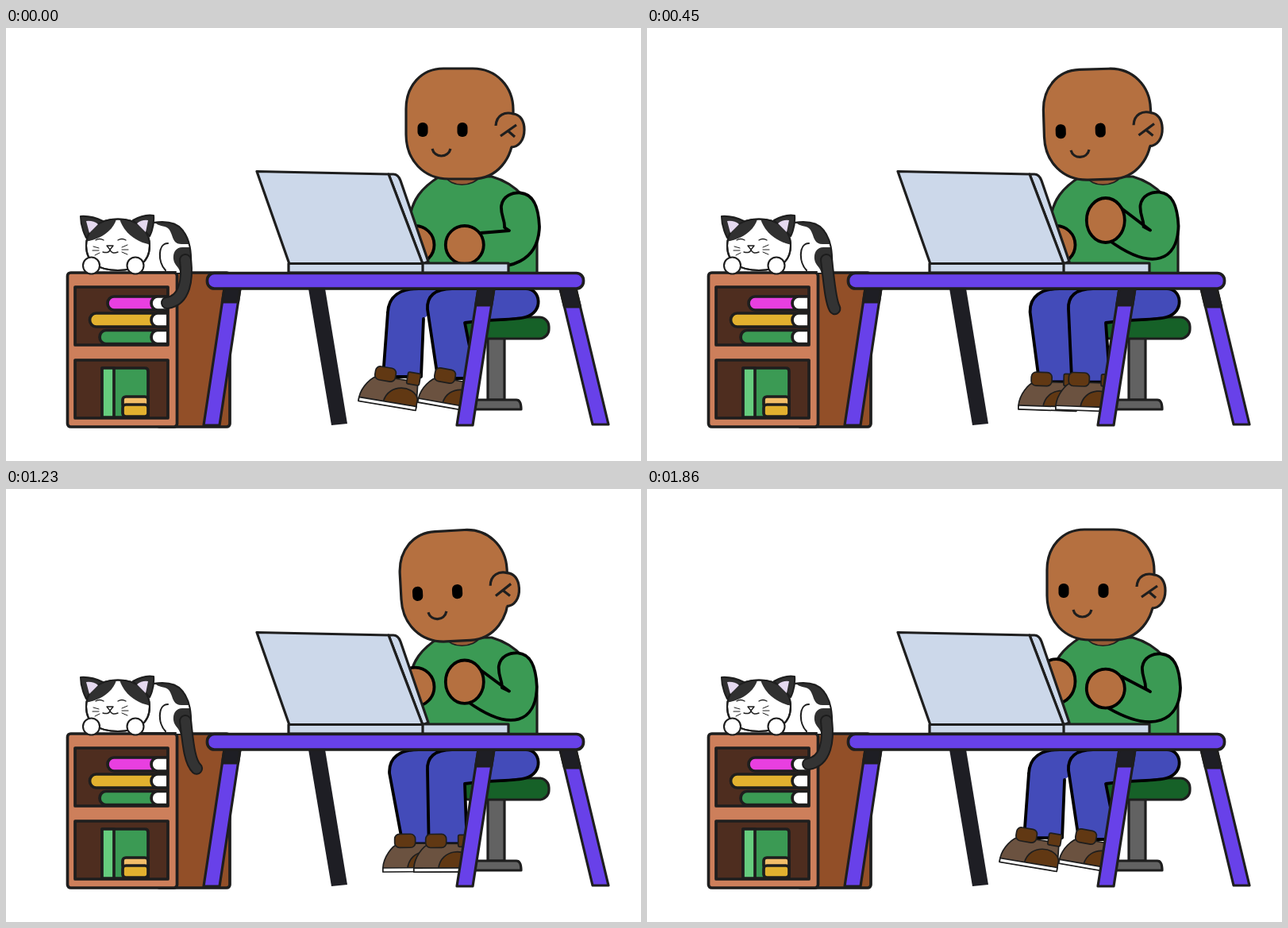
Write an HTML page that moves like this. It is 800x545 px and loops after 1890 ms.

```html
<!DOCTYPE html>
<html lang="en">
<head>
<meta charset="utf-8">
<title>Working at a desk with a cat</title>
<style>
html, body { margin: 0; width: 100%; height: 100%; overflow: hidden; background: #fff; }
svg { display: block; width: 100vw; height: 100vh; }
.ink { stroke: #1e1e1e; stroke-width: 3.2; stroke-linejoin: round; stroke-linecap: round; }
.heavy { stroke-width: 3.7; }
.bold { stroke: #000; stroke-width: 3.8; }
.thin { stroke-width: 1.7; }
.cat { stroke-width: 2.1; }
.line { fill: none; }
.skin { fill: #b57040; }
.shirt { fill: #3b9a54; }
.jeans { fill: #434bb9; }
.purple { fill: #6841e9; }
.metal { fill: #ccd8ea; }
.dark { fill: #1e1e24; }
.fur { fill: #303030; }
.white { fill: #fff; }
.wood { fill: #cd7f5b; }
.hollow { fill: #4e2d1f; }
.gold { fill: #e2b12f; }
.green { fill: #3b9a54; }
</style>
</head>
<body>
<svg viewBox="0 0 800 545" preserveAspectRatio="none">
  <defs>
    <g id="shoe">
      <path class="ink thin" fill="#6b5240" d="M-28 33C-27 20-17 6-8 3H42L45 34V38H-28Z"/>
      <path class="ink thin" fill="#613813" d="M3 34C6 9 39 8 45 24V34Z"/>
      <path class="ink thin white" d="M-28 33.500H45V38.500H-28Z"/>
      <rect class="ink thin" fill="#613813" x="-13" y="-9" width="26" height="17" rx="6"/>
      <rect class="ink thin" fill="#613813" x="28" y="-8" width="16" height="15" rx="2"/>
    </g>
    <clipPath id="headClip"><path id="catHead" d="M141 240.500C165 240.500 181 254 181 274C181 296 164 305 141 305C118 305 101 296 101 274C101 254 117 240.500 141 240.500Z"/></clipPath>
    <clipPath id="bodyClip"><path id="catBody" d="M165 250C185 242 212 241 222 254C232 266 234 282 233 308H165Z"/></clipPath>
  </defs>

  <!-- stool -->
  <g class="ink">
    <rect x="607" y="388" width="21" height="80" fill="#626262"/>
    <path d="M590 468H643Q649 468 649 480H590Z" fill="#626262"/>
    <rect x="572" y="364" width="112" height="27" rx="12" fill="#166128"/>
  </g>
  <path class="dark" d="M381 328H402L430 498 410 500Z"/>

  <!-- legs -->
  <path id="farLeg" class="ink bold jeans"/>
  <use id="farShoe" href="#shoe"/>
  <path id="nearLeg" class="ink bold jeans"/>
  <use id="nearShoe" href="#shoe"/>

  <!-- upper body -->
  <path class="ink shirt" d="M508 310V245C510 216 525 200 546 187H612C640 195 668 218 669 260V310Z"/>
  <path class="ink thin" fill="#965a35" d="M553 186C560 201 588 201 598 186Z"/>
  <ellipse id="farHand" class="ink skin bold" rx="24"/>
  <path id="arm" class="ink bold shirt"/>
  <ellipse id="nearHand" class="ink skin bold" rx="24"/>
  <g id="head" class="ink">
    <path class="skin" d="M551 51H588C618 51 639 74 639 103V132C639 165 618 190 588 190H558C526 190 504 166 504 134V102C504 73 523 51 551 51Z"/>
    <path class="skin" d="M617 123C618 109 629 105 639 108C648 109 653 117 653 128C653 141 646 150 636 150" stroke-linecap="butt"/>
    <path class="line" d="M623 136L643 122M633 130L641 137" stroke-linecap="butt"/>
    <path class="line" d="M537 152C540 164 557 164 560 152" stroke-linecap="butt"/>
    <rect x="518.500" y="119" width="13" height="18" rx="6" fill="#000" stroke="none"/>
    <rect x="568.500" y="119" width="13" height="18" rx="6" fill="#000" stroke="none"/>
  </g>

  <!-- laptop -->
  <g class="ink metal">
    <path d="M482 184H488Q494 184 497 192L532 294 525 297Z"/>
    <path d="M316 180.500L482 184 525 297H357Z"/>
    <path d="M356 296.500H525V308H356ZM525 296H633V308H525Z"/>
  </g>

  <!-- cabinet -->
  <g class="ink heavy">
    <rect x="190" y="308" width="92" height="194" rx="4" fill="#924f28"/>
    <rect class="wood" x="77.500" y="308" width="138" height="194" rx="4"/>
    <path class="hollow" d="M87 326H204V399H87ZM87 418H204V491H87Z"/>
    <g id="books"></g>
    <path class="green" d="M121 428H175Q179 428 179 432V490H121Z"/>
    <path fill="#66cd7e" d="M121 428H136V490H121Z"/>
    <rect fill="#f2bd69" x="147" y="464" width="32" height="14" rx="4"/>
    <rect class="gold" x="147" y="474" width="32" height="15" rx="4"/>
  </g>

  <!-- table -->
  <g id="tableLegs" class="ink"></g>
  <rect class="ink heavy purple" x="253.500" y="308.500" width="474" height="19.500" rx="9"/>

  <!-- cat -->
  <use class="white" href="#catBody"/>
  <g clip-path="url(#bodyClip)" class="fur">
    <path d="M184 238C189 252 198 247 204 252C211 258 208 272 221 272H236V238Z"/>
    <path d="M236 276H222C214 276 210 283 211 291C212 299 219 301 220 310H236Z"/>
  </g>
  <path class="ink cat line" d="M175 247C192 243 212 241 222 254C232 266 234 282 233 306"/>
  <path class="ink cat line" d="M204 271C191 271 191 295 201 305M168 307H214"/>
  <g class="line" stroke-linecap="round">
    <path class="tail" stroke="#1c1c1c" stroke-width="16"/>
    <path class="tail" stroke="#333" stroke-width="12"/>
  </g>
  <g class="ink cat">
    <path class="fur" d="M94 237Q108 236 122 243L101 264Q94 250 94 237Z"/>
    <path class="fur" d="M186 236Q174 234 160 242L181 262Q187 250 186 236Z"/>
    <use class="white" href="#catHead"/>
    <g clip-path="url(#headClip)" class="fur" stroke="none">
      <path d="M98 236H140C138 252 123 265 100 269Z"/>
      <path d="M142 236H184V273C163 270 146 256 142 236Z"/>
    </g>
    <use class="line" href="#catHead"/>
  </g>
  <path fill="#e5d9ef" d="M101 243Q110 242 116 247L105 258ZM179 242Q171 241 165 246L176 257Z"/>
  <g class="ink line" style="stroke-width:1.400">
    <path d="M113 267Q118 264 123 267M141 267Q146 264 151 267"/>
    <path d="M127 274H135L131 279ZM131 279Q130 284 122 282M131 279Q133 285 141 282"/>
    <path d="M110 275L117 277M109 280L117 280M112 286L118 283M146 276L153 273M146 279L154 279M146 282L153 285" style="stroke-width:1"/>
  </g>
  <circle class="ink cat white" cx="107.500" cy="299" r="10.500"/>
  <circle class="ink cat white" cx="163" cy="299" r="10.500"/>
</svg>

<script>
const LOOP = 1890, STEP = 30, TAP = 189;
const $ = id => document.getElementById(id);
const put = (node, attrs) => {
  for (const name in attrs) node.setAttribute(name, attrs[name]);
};
const mix = (a, b, k) => a + (b - a) * k;
const ease = u => (1 - Math.cos(Math.PI * u)) / 2;
// Eases from 0 to 1 at the peak time, then back to 0 at the end of the loop
const swing = (t, peak) => ease(t < peak ? t / peak : (LOOP - t) / (LOOP - peak));

// Books lying down: left edge, top, colour
$('books').innerHTML = [[128, 338, '#e83fe0'], [105.5, 359, '#e2b12f'], [118, 380.5, '#3b9a54']]
  .map(([x, y, fill]) => `<path fill="${fill}" d="M202 ${y}H${x + 8}a8 8.500 0 0 0 0 17H202"/>
    <path class="white" d="M202 ${y}H191a8 8.500 0 0 0 0 17H202"/>`).join('');

// Table legs: top left, foot left, foot y, cap end y
$('tableLegs').innerHTML = [[275, 249, 500, 345], [595, 568, 500, 349], [698, 739, 499, 351]]
  .map(([top, foot, floor, cap]) => {
    const capX = mix(top, foot, (cap - 328) / (floor - 328));
    return `<path class="purple" d="M${top} 328H${top + 20}L${foot + 20} ${floor}H${foot}Z"/>
      <path class="dark" d="M${top} 328H${top + 20}L${capX + 20} ${cap}H${capX}Z"/>`;
  }).join('');

// Hand taps: phase, centre y, vertical radius
const nearTap = [[0, 273, 24], [.238, 244, 26.5], [.381, 242, 28], [.492, 242.5, 27.5],
  [.619, 244, 25], [.794, 253, 26.5], [.841, 251, 24.5], [1, 273, 24]];
const farTap = [[0, 273, 24], [.238, 256, 27], [.381, 273, 24], [.492, 250, 24],
  [.619, 242, 27], [.841, 242, 28], [1, 273, 24]];

function sample(table, p) {
  const i = table.findIndex(row => row[0] > p);
  const a = table[i - 1], b = table[i];
  const k = (p - a[0]) / (b[0] - a[0]);
  return [mix(a[1], b[1], k), mix(a[2], b[2], k)];
}

function drawLegs(k) {
  const lift = k * (2 - k);
  const fx = mix(478, 513, k), fy = mix(436, 444, lift);
  const nx = mix(553, 537, k), ny = mix(438, 444, lift);
  put($('farLeg'), {d: `M570 328H520C496 328 482 338 ${mix(481, 484, k)} 358L${fx - 3} ${fy + 3}
    H${fx + 45}L${mix(526, 545, k)} 366`});
  put($('nearLeg'), {d: `M655 328H562C540 328 530 338 531 354L${nx - 9} ${ny + 3}H${nx + 39}
    L578 371C610 366 640 368 654 364C678 358 674 328 655 328Z`});
  put($('farShoe'), {transform: `translate(${fx} ${fy}) rotate(${mix(9.5, -4.5, k)})`});
  put($('nearShoe'), {transform: `translate(${nx} ${ny}) rotate(${mix(10, -4.5, k)})`});
}

function drawArms(k, phase) {
  const [y, ry] = sample(nearTap, phase);
  const [farY, farRy] = sample(farTap, phase);
  const x = 577.8, dx = -4.5 * k, dy = -1.5 * k;
  put($('nearHand'), {cx: x, cy: y, ry});
  put($('farHand'), {cx: 515.5, cy: farY, ry: farRy});
  put($('arm'), {d: `M${x + 20} ${y - 15}L634 ${255 + dy / 2}L${628 + dx} ${251 + dy}
    C${629 + dx} 242 ${623 + dx} 236 ${624 + dx} ${224 + dy}
    C${626 + dx} ${211 + dy} ${638 + dx} ${207 + dy} ${648 + dx} ${207.5 + dy}
    C${666 + dx} ${209 + dy} ${671 + dx} ${228 + dy} ${672 + dx} ${250 + dy}
    C${671 + dx} 292 638 308 ${x + 4} ${y + 25}`});
}

function drawTail(k) {
  const x = 203 + 56 * k, y = 346 + 43.7 * k - 53 * k * k;
  const bend = 226 + 20 * k * (1 - k);
  const d = `M226 292C229 315 ${bend} 343 ${x} ${y}`;
  document.querySelectorAll('.tail').forEach(node => put(node, {d}));
}

function draw(t) {
  put($('head'), {transform: `rotate(${-4 * swing(t, LOOP / 2)} 592 245)`});
  const k = swing(t, 850);
  drawLegs(k);
  drawArms(k, t % TAP / TAP);
  drawTail(swing(t, 800));
}

const start = performance.now();
function tick(now) {
  const t = Math.max(0, now - start) % LOOP;
  draw(Math.floor(t / STEP) * STEP);
  requestAnimationFrame(tick);
}
draw(0);
requestAnimationFrame(tick);
</script>
</body>
</html>
```
